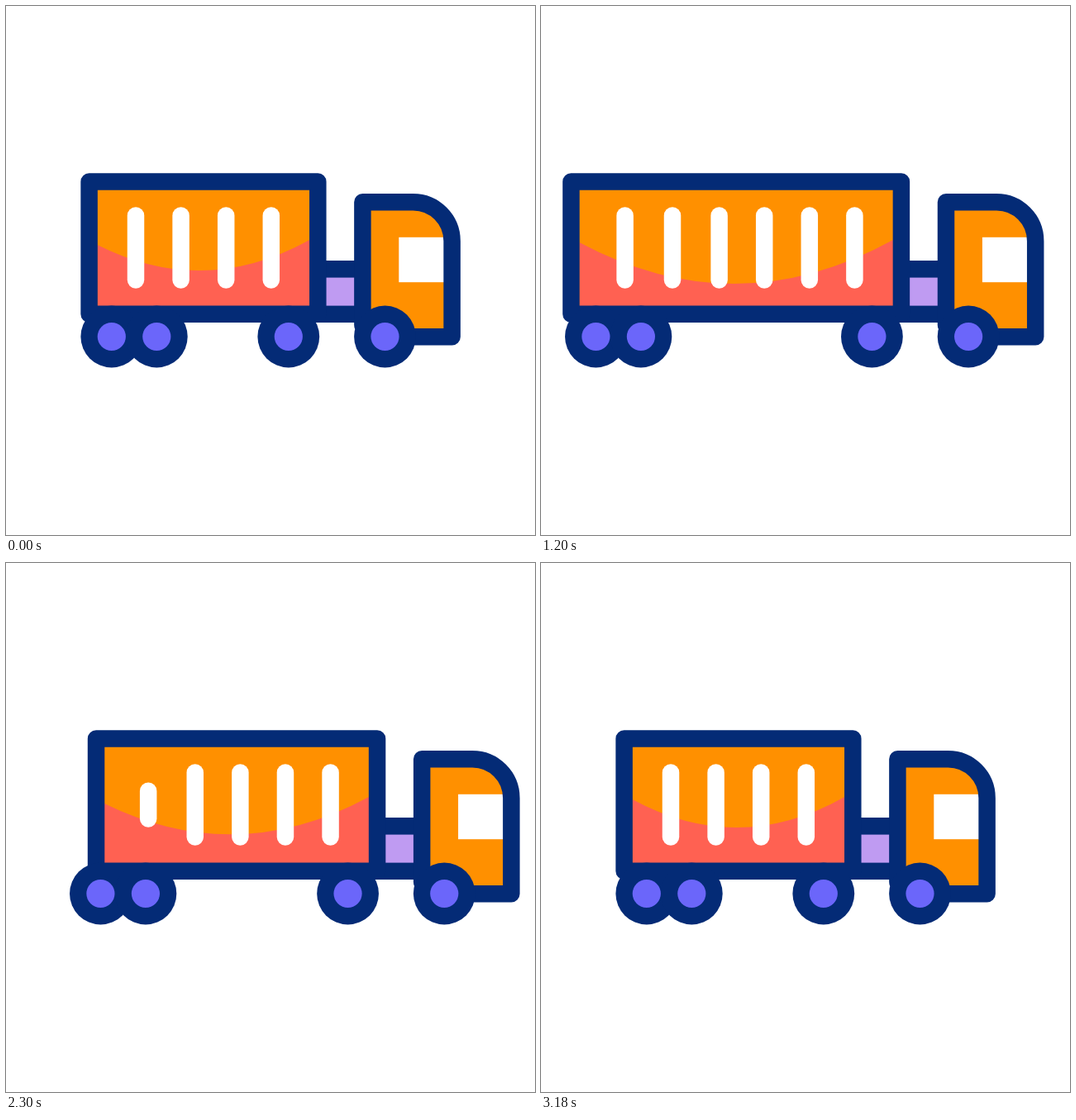
Write an HTML page with a canvas that moves like this. It is 640 by 640 pixels and loops after 3.6 s.

```html
<!DOCTYPE html>
<html lang="en">
<head>
<meta charset="utf-8">
<title>Truck</title>
<style>
html, body { margin: 0; width: 100%; height: 100%; overflow: hidden; background: #fff; }
canvas { display: block; width: 640px; height: 640px; }
</style>
</head>
<body>
<canvas id="stage" width="640" height="640"></canvas>
<script>
const ctx = document.getElementById('stage').getContext('2d');
const LOOP = 3600;
const NAVY = '#042b76', ORANGE = '#ff9000', RED = '#ff6152';
const LILAC = '#bf9bf2', VIOLET = '#6b66fa', WHITE = '#fff';
const LINE = 20.5;

// Eased progress from a to b; x1 and x2 are the handle positions.
function ease(t, a, b, x1 = 1 / 3, x2 = 2 / 3) {
  const x = Math.min(1, Math.max(0, (t - a) / (b - a)));
  let lo = 0, hi = 1, s = x;
  for (let i = 0; i < 24; i++) {
    s = (lo + hi) / 2;
    const v = 3 * (1 - s) * (1 - s) * s * x1 + 3 * (1 - s) * s * s * x2 + s * s * s;
    if (v < x) lo = s; else hi = s;
  }
  return x === 0 || x === 1 ? x : s * s * (3 - 2 * s);
}

function box(color, x, y, w, h) {
  ctx.fillStyle = color;
  ctx.fillRect(x, y, w, h);
}

function disc(color, x, y, r) {
  ctx.fillStyle = color;
  ctx.beginPath();
  ctx.arc(x, y, r, 0, Math.PI * 2);
  ctx.fill();
}

function wheel(x) {
  disc(NAVY, x, 400, 37.4);
  disc(VIOLET, x, 400, 17.1);
}

function bar(x, grow) {
  if (grow <= 0) return;
  const half = 39 * grow;
  ctx.strokeStyle = WHITE;
  ctx.beginPath();
  ctx.moveTo(x, 292.6 - half);
  ctx.lineTo(x, 292.6 + half);
  ctx.stroke();
}

function cab() {
  ctx.beginPath();
  ctx.moveTo(431.4, 237.3);
  ctx.lineTo(492.5, 237.3);
  ctx.arc(492.5, 284.4, 47.1, -Math.PI / 2, 0);
  ctx.lineTo(539.6, 400.2);
  ctx.lineTo(458.5, 400.2);
  ctx.lineTo(431.4, 386);
  ctx.closePath();
  ctx.fillStyle = ORANGE;
  ctx.fill();
  box(WHITE, 475.3, 279.8, 56, 54.4);
  ctx.strokeStyle = NAVY;
  ctx.stroke();
  wheel(458.5);
}

function trailer(t) {
  const grow = ease(t, 160, 685), shrink = ease(t, 2044, 2569);
  const stretch = grow - shrink;
  const right = 377.3, left = 100.6 - 122.8 * stretch;
  const inL = left + 10, inR = right - 10;
  const yL = 286 + 3 * (1 - grow) + 20 * shrink * (1 - shrink), yR = 283;
  const low = 320 + 16 * stretch;

  box(ORANGE, left, 212.5, right - left, 160.4);
  ctx.fillStyle = RED;
  ctx.beginPath();
  ctx.moveTo(inL, yL);
  ctx.quadraticCurveTo((inL + inR) / 2, 2 * low - (yL + yR) / 2, inR, yR);
  ctx.lineTo(inR, 373);
  ctx.lineTo(inL, 373);
  ctx.fill();

  for (let i = 0; i < 4; i++) bar(320.8 - 54.6 * i, 1);
  bar(100.4, ease(t, 615, 855) - ease(t, 2170, 2410));
  bar(43, ease(t, 790, 1030) - ease(t, 1990, 2230));

  ctx.strokeStyle = NAVY;
  ctx.strokeRect(left, 212.6, right - left, 160.2);
}

function draw(t) {
  ctx.fillStyle = WHITE;
  ctx.fillRect(0, 0, 640, 640);
  ctx.lineWidth = LINE;
  ctx.lineCap = ctx.lineJoin = 'round';

  const drive = 42.5 * ease(t, 0, 420) + 36 * ease(t, 420, 2100)
    - 78.5 * ease(t, 2100, 3180, 0.32, 0.8);
  const spread = 120 * (ease(t, 0, 860) - ease(t, 1903, 3020));

  ctx.save();
  ctx.translate(drive, 0);
  box(NAVY, 377, 308, 55, 75);
  box(LILAC, 377, 328.6, 55, 34);
  trailer(t);
  cab();
  wheel(341.8);
  const rear = [127.8 - spread, 182.3 - spread];
  for (const x of rear) disc(NAVY, x, 400, 37.4);
  for (const x of rear) disc(VIOLET, x, 400, 17.1);
  ctx.restore();
}

const start = performance.now();
function tick() {
  draw((performance.now() - start) % LOOP);
  requestAnimationFrame(tick);
}
tick();
</script>
</body>
</html>
```
